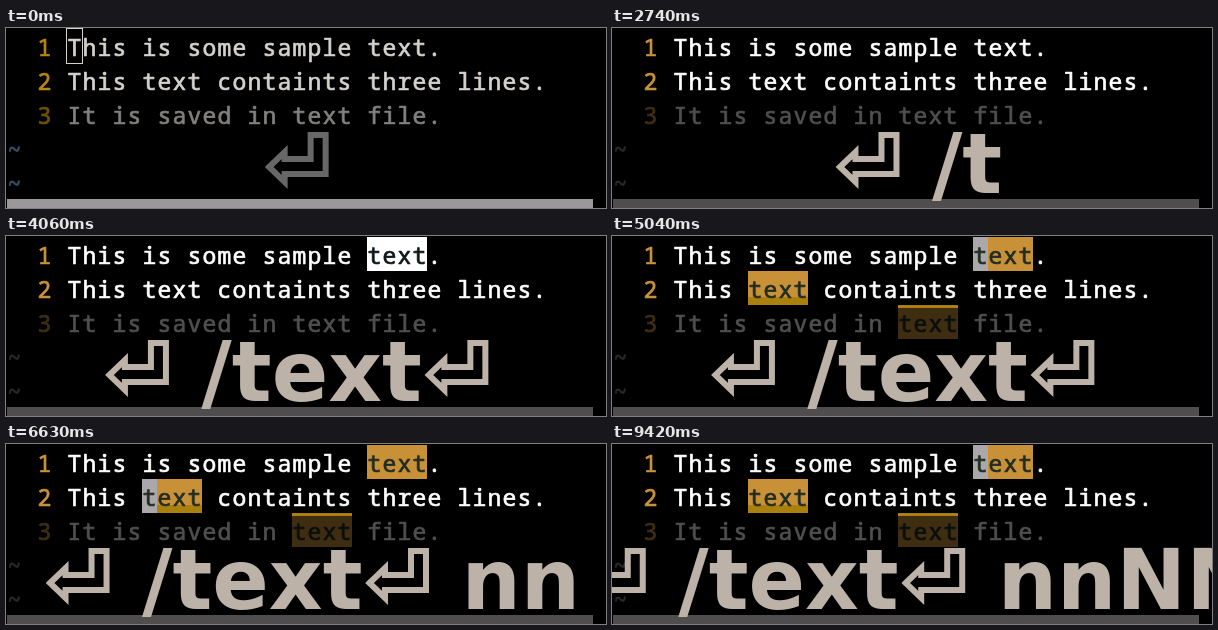
An HTML page with a canvas that plays this animation: 600 by 180 pixels, repeating every 9860 ms.

```html
<!DOCTYPE html>
<html lang="en">
<head>
<meta charset="utf-8">
<title>Searching in a text editor</title>
<style>
html, body { margin: 0; width: 100%; height: 100%; overflow: hidden; background: #000; }
canvas { display: block; width: 600px; height: 180px; }
</style>
</head>
<body>
<canvas id="stage" width="600" height="180"></canvas>
<script>
const ctx = document.getElementById('stage').getContext('2d');
const LOOP = 9860;
const CELL = 15, ROW = 34, LEFT = 1, TOP = 1, TEXT_COL = 4;
const MONO = '23px "Noto Sans Mono", "DejaVu Sans Mono", monospace';
const KEY_SIZE = 83.4, KEY_BASE = 165, KEY_CENTER = 305.6;
const KEYS = `bold ${KEY_SIZE}px "DejaVu Sans", sans-serif`;
const RETURN_WIDTH = 0.838 * KEY_SIZE;
const OVERLAY_TOP = 72;

const LINES = [
  'This is some sample text.',
  'This text containts three lines.',
  'It is saved in text file.'
];
const MATCHES = LINES.map(line => line.indexOf('text'));

const BLURRED = { text: '#d5d2ce', number: '#b8860b', tilde: '#5585a8', key: '#b6b6b6' };
const FOCUSED = { text: '#ffffff', number: '#cb9339', tilde: '#848484', key: '#bcb2a8' };
const MATCH = '#c89138', MATCH_LOW = '#ac800e', MATCH_TEXT = '#212d23';
const CURSOR = '#aaa8aa', BAR = '#fff8fc';

// Pressed keys; ⏎ is drawn as an arrow.
const TYPED = [
  [0, '⏎ '], [2070, '⏎ /'], [2740, '⏎ /t'], [3010, '⏎ /te'],
  [3330, '⏎ /tex'], [3580, '⏎ /text'], [4060, '⏎ /text⏎ '],
  [5540, '⏎ /text⏎ n'], [6630, '⏎ /text⏎ nn'],
  [7670, '⏎ /text⏎ nnN'], [9380, '⏎ /text⏎ nnNN']
];
// Length of the part found while typing; "all" marks every match.
const FOUND = [[0, 0], [2780, 1], [3050, 2], [3370, 3], [3580, 4], [4100, 'all']];
// Row of the solid cursor, or -1 while it is hidden.
const CURSORS = [
  [0, -1], [330, 0], [790, -1], [1290, 0], [1790, -1],
  [4100, 0], [4550, -1], [5040, 0], [5540, -1],
  [5580, 1], [6030, -1], [6530, 1], [6670, 2], [7130, -1],
  [7710, 1], [8200, -1], [8660, 1], [9420, 0]
];
const OPACITY = [[0, 0.57], [40, 0.79], [80, 1]];

function at(track, t) {
  let value = track[0][1];
  for (const [start, next] of track) if (t >= start) value = next;
  return value;
}

const colX = col => LEFT + col * CELL;
const rowY = row => TOP + row * ROW;
const themeAt = t => t < 330 ? BLURRED : FOCUSED;

function box(x, y, w, h, color) {
  ctx.fillStyle = color;
  ctx.fillRect(x, y, w, h);
}

// A thin outline gives the letters a medium weight.
function write(str, col, row, color) {
  ctx.font = MONO;
  ctx.textAlign = 'center';
  ctx.fillStyle = ctx.strokeStyle = color;
  ctx.lineWidth = 0.7;
  ctx.lineJoin = 'round';
  [...str].forEach((ch, i) => {
    const x = colX(col + i) + CELL / 2, y = rowY(row) + 27;
    ctx.fillText(ch, x, y);
    ctx.strokeText(ch, x, y);
  });
}

function mark(row, start, length, back, color) {
  const col = TEXT_COL + start;
  box(colX(col), rowY(row), length * CELL, ROW, back);
  if (back === MATCH) {
    const top = Math.max(rowY(row), 61);
    const bottom = Math.min(rowY(row) + ROW, OVERLAY_TOP);
    if (bottom > top) box(colX(col), top, length * CELL, bottom - top, MATCH_LOW);
  }
  write(LINES[row].substr(start, length), col, row, color);
}

function drawEditor(t) {
  const theme = themeAt(t);
  const found = at(FOUND, t), cursor = at(CURSORS, t);
  LINES.forEach((line, row) => {
    write(String(row + 1), 2, row, theme.number);
    write(line, TEXT_COL, row, theme.text);
    if (found === 'all') mark(row, MATCHES[row], 4, MATCH, MATCH_TEXT);
  });
  write('~', 0, 3, theme.tilde);
  write('~', 0, 4, theme.tilde);
  box(1, 171, 586, 9, BAR);

  if (found > 0) mark(0, MATCHES[0], found, '#fff', '#10181c');
  if (theme === BLURRED) {
    ctx.strokeStyle = theme.text;
    ctx.lineWidth = 1;
    ctx.lineJoin = 'miter';
    ctx.strokeRect(colX(TEXT_COL) - 0.5, TOP - 0.5, CELL + 1, ROW + 1);
  }
  if (cursor >= 0) {
    const searched = found === 'all';
    mark(cursor, searched ? MATCHES[cursor] : 0, 1, CURSOR, searched ? MATCH_TEXT : '#fff');
  }
}

function drawReturn(x, color) {
  const points = [[7, 139], [22.5, 124], [22.5, 131], [48.5, 131], [48.5, 107],
    [63.5, 107], [63.5, 146], [22.5, 146], [22.5, 154]];
  ctx.beginPath();
  points.forEach(([px, py]) => ctx.lineTo(x + px, py));
  ctx.closePath();
  ctx.lineWidth = 6;
  ctx.lineJoin = 'miter';
  ctx.strokeStyle = color;
  ctx.stroke();
}

function drawKeys(t) {
  const keys = [...at(TYPED, t)], color = themeAt(t).key;
  ctx.font = KEYS;
  ctx.textAlign = 'left';
  ctx.fillStyle = color;
  const widths = keys.map(k => k === '⏎' ? RETURN_WIDTH : ctx.measureText(k).width);
  let x = KEY_CENTER - widths.reduce((a, b) => a + b) / 2;
  keys.forEach((k, i) => {
    if (k === '⏎') drawReturn(x, color);
    else ctx.fillText(k, x, KEY_BASE);
    x += widths[i];
  });
}

function draw(t) {
  box(0, 0, 600, 180, '#000');
  drawEditor(t);
  const opacity = at(OPACITY, t);
  ctx.globalAlpha = 0.69 * opacity;
  box(0, OVERLAY_TOP, 600, 180 - OVERLAY_TOP, '#000');
  ctx.globalAlpha = opacity;
  drawKeys(t);
  ctx.globalAlpha = 1;
}

let begin = null;
function frame(now) {
  if (begin === null) begin = now;
  draw((now - begin) % LOOP);
  requestAnimationFrame(frame);
}
draw(0);
requestAnimationFrame(frame);
</script>
</body>
</html>
```
